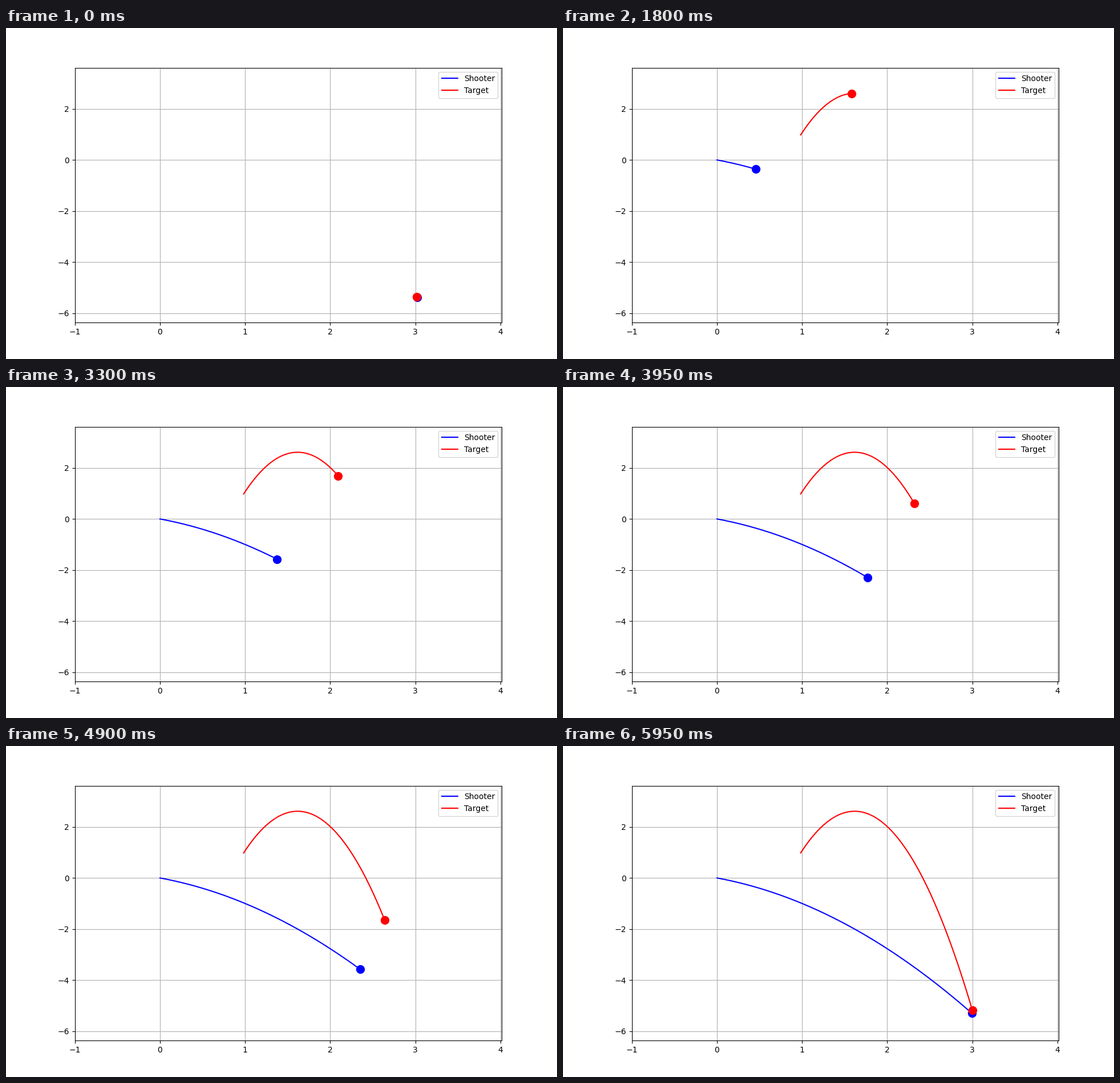
A matplotlib script that plays this animation: 966 by 580 pixels, repeating every 6000 ms.

```python
import numpy as np
import matplotlib.pyplot as plt
from matplotlib.animation import FuncAnimation

STEPS = 120
LAUNCH = 20  # step at which the shooter fires

n = np.arange(STEPS)

# Target: steady drift in x, ballistic arc in y
target_x = 0.983 + 0.01709 * n
target_y = 2.613 - 0.0011884 * (n - 37.05) ** 2

# Shooter: waits at the origin, then falls along its own arc
s = np.maximum(n - LAUNCH, 0)
shooter_x = 0.03054 * s
shooter_y = -(0.01873 * s + 0.00036 * s ** 2)

fig, ax = plt.subplots(figsize=(9.66, 5.8), dpi=100)
ax.set_xlim(-1, target_x.max() + 1)
ax.set_ylim(target_y.min() - 1, target_y.max() + 1)
ax.grid(True)


def make_body(color, label):
    trail, = ax.plot([], [], color + "-", label=label)
    dot, = ax.plot([], [], color + "o", markersize=10)
    return trail, dot


bodies = [
    (*make_body("b", "Shooter"), shooter_x, shooter_y),
    (*make_body("r", "Target"), target_x, target_y),
]
ax.legend(loc="upper right")


def update(i):
    # At i = 0 the trails are empty and the dots rest at the final point
    artists = []
    for trail, dot, x, y in bodies:
        trail.set_data(x[:i], y[:i])
        dot.set_data([x[i - 1]], [y[i - 1]])
        artists += [trail, dot]
    return artists


anim = FuncAnimation(fig, update, frames=STEPS, interval=50, repeat=True)
plt.show()
```
